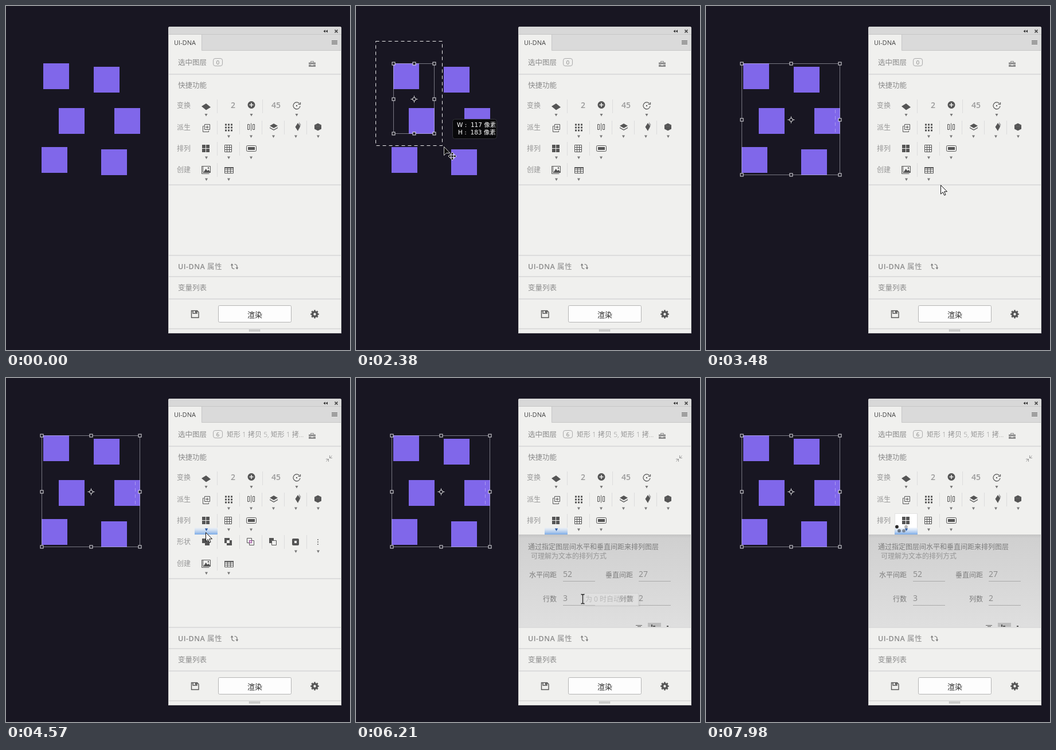
Write an HTML page that moves like this. It is 600 px wide and 600 px high and loops after 8000 ms.

```html
<!DOCTYPE html>
<html lang="zh">
<meta charset="utf-8">
<title>UI-DNA</title>
<style>
html, body { margin: 0; height: 100%; overflow: hidden; background: #181622; }
svg { display: block; width: 100vw; height: 100vh; }
text { font: 12px "Open Sans", "Noto Sans CJK SC", "Noto Sans CJK", sans-serif; fill: #7c7c7c; white-space: pre; }
text.head { font-size: 12.5px; font-weight: 500; fill: #8a8a8a; }
text.row, text.thin { font-weight: 300; fill: #959595; }
text.num { font-size: 14px; font-weight: 600; fill: #9a9a9a; text-anchor: middle; }
text.val { font-size: 14px; fill: #888; }
text.tip { font: 10.5px "DejaVu Sans", "Noto Sans CJK SC", sans-serif; fill: #fff; }
.fill { fill: #555; }
.line { fill: none; stroke: #555; }
.tri { fill: #777; }
.sep { stroke: #dcdcdc; }
.rule { fill: #dcdcdc; }
</style>
<svg id="stage" viewBox="0 0 600 600"></svg>
<script>
const stage = document.getElementById('stage');
const squares = [[65, 100], [153, 106], [92, 178], [189, 178], [62, 246], [166, 250]];
const SIZE = 45, LOOP = 8000, START = [34, 61];

// time, x, y, pointer kind ('' hides it)
const track = [
  [0, 0, 0, ''], [850, 403, 545, 'arrow'], [1070, 290, 385, 'arrow'], [1180, 70, 122, 'arrow'],
  [1290, 29, 73, 'arrow'], [1620, 37, 68, 'move'], [1730, 34, 61, 'move'],
  [1950, 59, 117, 'move'], [2170, 88, 160, 'move'], [2280, 123, 207, 'move'], [2380, 151, 244, 'move'],
  [2500, 167, 271, 'move'], [2720, 192, 294, 'move'], [2830, 212, 311, 'move'], [2950, 226, 321, 'move'],
  [3060, 237, 328, 'move'], [3270, 252, 326, 'move'], [3380, 345, 321, 'arrow'], [3480, 409, 312, 'arrow'],
  [3580, 437, 285, 'arrow'], [3810, 397, 266, 'arrow'], [3920, 360, 253, 'arrow'], [4030, 348, 251, 'arrow'],
  [4350, 348, 269, 'arrow'], [4900, 355, 305, 'arrow'], [5010, 372, 365, 'arrow'], [5120, 385, 410, 'arrow'],
  [5450, 395, 386, 'beam'], [5660, 395, 385, 'beam'], [6550, 389, 366, 'arrow'], [6650, 372, 328, 'arrow'],
  [6760, 354, 287, 'arrow'], [6870, 342, 264, 'arrow'], [7110, 341, 259, 'arrow'], [7640, 0, 0, '']
];
const hintTrack = [[0, 0], [6210, .35], [6310, 1], [6650, .75], [6760, .45], [6870, .2], [7110, 0]];
const busyTrack = [[0, 0], [7640, 1], [7750, 2], [7860, 3], [7980, 4]];

const rect = (x, y, w, h, attrs = '') => `<rect x="${x}" y="${y}" width="${w}" height="${h}" ${attrs}/>`;
const path = (d, attrs = 'class="fill"') => `<path d="${d}" ${attrs}/>`;
const text = (x, y, s, kind = '') => `<text x="${x}" y="${y}" class="${kind}">${s}</text>`;
const tris = (y, ...xs) => path(xs.map(x => `M${x - 2.5} ${y - 2}h5l-2.5 4.5z`).join(''), 'class="tri"');
const seps = (y, ...xs) => path(xs.map(x => `M${x + .5} ${y - 12}v24`).join(''), 'class="sep"');
const box = (x, y, w, h = w) => `M${x} ${y}h${w}v${h}h${-w}z`;
const rule = y => rect(284, y, 300, 2, 'class="rule"');
const grid = (x, y, dx, dy, cols, rows) => {
  let d = '';
  for (let i = 0; i <= cols; i++) d += `M${x + i * dx} ${y}v${dy * rows}`;
  for (let j = 0; j <= rows; j++) d += `M${x} ${y + j * dy}h${dx * cols}`;
  return d;
};
const dots = [0, 1, 2, 3, 4, 5, 6, 7, 8].map(i => box(382 + i % 3 * 5, 205.5 + (i / 3 | 0) * 5, 3)).join('');

const panel = `
  ${path('M283 571V39q0-3 3-3h296q3 0 3 3v532z', 'fill="#f0f0ee"')}
  ${path('M283 50V39q0-3 3-3h296q3 0 3 3v11z', 'fill="#d8d8d8"')}
  ${rect(341, 50, 244, 28, 'fill="#dadada"')}
  ${path('M283 49.5h302M341.5 50v27.5H585', 'fill="none" stroke="#c6c6c6"')}
  ${path('M283.5 50v520.5h301V50', 'fill="none" stroke="#cfcfcf"')}
  ${path('M557 41.5v5l-3.5-2.5zM561 41.5v5l-3.5-2.5z', 'fill="#333"')}
  ${path('M573.5 41.5l5 5m0-5l-5 5', 'stroke="#444" stroke-width="1.7"')}
  ${path('M568 60.5h10m-10 2h10m-10 2h10m-10 2h10', 'stroke="#666"')}
  <text x="293" y="68" style="font-size:11px;fill:#444">UI-DNA</text>
  ${text(300, 102.5, '选中图层', 'head')}
  ${rect(361.5, 91.5, 16, 13, 'rx="3.5" fill="none" stroke="#aaa"')}
  <text id="count" x="369.5" y="102" text-anchor="middle" style="font-size:9.5px"></text>
  ${path('M528 98.5h12v3h-12zM528 102.5h4v1h4v-1h4v3.5h-12z', 'fill="#888"')}
  ${path('M531.5 98.5v-2h5v2', 'fill="none" stroke="#888"')}
  ${rule(118)} ${text(300, 142.5, '快捷功能', 'head')}
  <g id="chosen">${text(385, 103, '矩形 1 拷贝 5, 矩形 1 拷...', 'thin')}
    ${path('M564.5 135v4.5h4.5M558 141.5h4.5v4.5M564.5 139.5l4-4M562.5 141.5l-4 4', 'fill="none" stroke="#999"')}</g>
  ${rect(329.5, 236.5, 39, 36, 'id="hover" fill="#fff" stroke="#e2e2e2"')}

  ${text(298, 178, '变换', 'row')} ${seps(175, 368, 447)} ${tris(190, 349, 428, 507)}
  ${path('M341 175l8-5 8 6.5-8 5z')}
  ${text(396, 178, '2', 'num')} ${text(471, 178, '45', 'num')}
  <circle cx="428" cy="172.500" r="6.500" class="fill"/>
  ${path('M428 169v7m-3.500-3.500h7', 'stroke="#f0f0ee" stroke-width="1.600"')}
  ${path('M512 170.500a6 6 0 1 0 1 4M513.500 168v3.500h-4', 'class="line" stroke-width="1.200"')}
  ${path('M506 173h2v2h-2z')}

  ${text(298, 216, '派生', 'row')} ${seps(212, 368, 407, 446, 485, 524)} ${tris(227.5, 388.5, 427.5, 466.5, 505.5, 544.5)}
  ${path('M345.500 209.500h-2v10h10v-2' + box(346.5, 206.5, 9) + 'M351 208.500v5.500m-2.700-2.700h5.500', 'class="line"')}
  ${path(dots)}
  ${path(box(421.5, 206.5, 3, 9) + box(430.5, 206.5, 3, 9) + 'M427.500 204.500v13', 'class="line"')}
  ${path('M467 205l7 4-7 4-7-4zM460 211.500l7 4 7-4v1.500l-7 4-7-4z')}
  ${path('M511 202l3.500 5-3.500 8z', 'fill="#aaa"')} ${path('M509 204l4 6-4 8-4.500-7z')}
  ${path('M544 204.500l6 3v7l-6 3-6-3v-7z')} ${path('M538.500 208l5.500 2.500 5.500-2.500', 'fill="none" stroke="#777" stroke-width=".600"')}

  ${text(298, 253, '排列', 'row')} ${seps(249, 368, 407)} ${tris(264.5, 349.5, 388.5, 427.5)}
  ${path(box(342, 242, 6) + box(349, 242, 6) + box(342, 249, 6) + box(349, 249, 6))}
  ${path(grid(381.5, 242.5, 4, 4, 3, 3), 'class="line"')}
  ${rect(419.5, 243.5, 17, 10, 'rx="2" class="line"')} ${rect(422, 246, 12, 5, 'class="fill"')}
  <g id="glow">${rect(329, 261, 40, 12, 'fill="url(#blue)"')}
    ${path('M347 262.500h5l-2.500 4.500z', 'fill="#2b5fae"')}</g>

  <g id="shape">${text(298, 290, '形状', 'row')} ${seps(286, 368, 407, 446, 485, 524)} ${tris(302.5, 505.5, 544.5)}
    ${path('M342 280h8v4h5v8h-8v-4h-5z')}
    ${path(box(381, 279, 9) + box(385, 283, 9), 'class="fill" fill-rule="evenodd"')}
    ${path(box(420.5, 279.5, 8) + box(424.5, 283.5, 8), 'class="line"')}
    ${path(box(424.5, 283.5, 4), 'fill="#e3c6e3" stroke="#a050a0"')}
    ${path('M459 279h8v4h-4v5h-4z')} ${path(box(463.5, 283.5, 8), 'class="line"')}
    ${rect(499, 280, 12, 12, 'rx="2" class="fill"')} ${rect(503, 284, 4, 4, 'fill="#eee"')}
    ${path(box(543, 281, 2) + box(543, 285, 2) + box(543, 289, 2), 'fill="#888"')}</g>
  <g id="create">${text(298, 290, '创建', 'row')} ${seps(286, 368)} ${tris(302.5, 349.5, 388.5)}
    ${path('M343.500 279.500h-2v13h13' + box(343.5, 279.5, 13, 11), 'class="line"')}
    ${path('M344.500 290l4-6 3 3.500 2-2 3 4.500z')} <circle cx="353" cy="282.500" r="1.300" class="fill"/>
    ${path(grid(381.5, 281.5, 5, 3.4, 3, 3), 'class="line"')} ${rect(381, 281, 16, 2, 'class="fill"')}
    ${rule(311)}</g>

  <g id="drawer">${rect(284, 273, 300, 161, 'fill="url(#gray)"')}
    <g id="form">
      ${text(300, 299, '通过指定图层间水平和垂直间距来排列图层')}
      ${text(305, 315, '可理解为文本的排列方式', 'thin')}
      ${text(302, 348, '水平间距')} ${text(361, 347, '52', 'val')} ${text(435, 348, '垂直间距')} ${text(493, 347, '27', 'val')}
      ${text(326, 390, '行数')} ${text(361, 389, '3', 'val')} ${text(459, 390, '列数')} ${text(493, 389, '2', 'val')}
      ${path('M361 354.500h56m76 0h56M361 396.500h56m76 0h56', 'stroke="#aaa"')}
      ${path('M488 431.500h11M491 433.500h6', 'stroke="#666"')} ${rect(509, 427, 23, 7, 'fill="#bcbcbc"')}
      ${path('M515 430h2v4h-2zM518 432h4v2h-4zM542 432h3v2h-3z')}
    </g></g>
  ${rule(434)} ${rule(471)} ${rule(510)} ${rule(562)}
  <text x="300" y="459" class="head" style="letter-spacing:.5px"><tspan font-weight="600">UI-DNA</tspan> 属性</text>
  ${path('M394 450.500v4q0 4 4.500 4M392.500 452.500l1.500-2.500 2 2.500M403 458.500v-4q0-4-4.500-4M404.500 456l-1.500 2.500-2-2.500', 'fill="none" stroke="#777" stroke-width="1.200"')}
  ${text(300, 496, '变量列表', 'head')}
  ${path('M323.500 531.500h10l2.500 2.500v9.500h-12.500zM326 532v4h7v-4', 'class="line" stroke-width="1.400"')} ${rect(330, 532, 2, 3, 'class="fill"')}
  ${rect(370.5, 522.5, 127, 29, 'rx="2" fill="#fdfdfd" stroke="#b4b4b4"')}
  <text x="434" y="542.500" text-anchor="middle" style="font-size:13px;fill:#333">渲染</text>
  <circle cx="538.500" cy="537.500" r="4" class="line" stroke-width="3.600"/>
  <circle cx="538.500" cy="537.500" r="6.200" class="line" stroke-width="2.400" pathLength="16" stroke-dasharray="1" stroke-dashoffset=".5"/>
  ${path('M424 566h19', 'stroke="#aaa" stroke-width="4" stroke-dasharray="1"')}`;

stage.innerHTML = `
  <defs>
    <linearGradient id="blue" x2="0" y2="1"><stop stop-color="#e6eefa" stop-opacity=".5"/><stop offset="1" stop-color="#7aaae6"/></linearGradient>
    <linearGradient id="gray" x2="0" y2="1"><stop stop-color="#c4c4c4"/><stop offset=".04" stop-color="#d0d0d0"/><stop offset="1" stop-color="#dfdfdf"/></linearGradient>
  </defs>
  ${squares.map(([x, y]) => rect(x, y, SIZE, SIZE, 'fill="#8067ea"')).join('')}
  ${path('M225.500 181v41', 'id="trace" stroke="#a898f0" stroke-dasharray="6 5" fill="none"')}
  ${panel}
  <g id="bounds"></g><g id="drag"></g>
  <g id="hint">${rect(400, 378, 96, 21, 'fill="#000" opacity=".1"')}${rect(398.5, 375.5, 94, 21, 'fill="#ececec" stroke="#c4c4c4"')}
    ${text(400, 390, '为 0 时自动计算')}</g>
  <g id="busy"></g>
  ${path('M.5 .5v15.500l3.700-3.400 2.500 5.600 2.300-1-2.400-5.500h4.900z', 'id="arrow" fill="#fff" stroke="#111"')}
  <g id="move">${path('M2.500 1.500v15l4-4h6.500z', 'fill="#111" stroke="#ccc"')}
    ${path('M17 11l3 3.500h-2v2.500h2.500v-2l3.500 3-3.500 3v-2h-2.500v2.500h2l-3 3.500-3-3.500h2v-2.500h-2.500v2l-3.500-3 3.500-3v2h2.500v-2.500h-2z', 'fill="#000" stroke="#fff" stroke-width=".900"')}</g>
  ${path('M-2.500-7.500h2l1 1 1-1h2M.5-6.500v14M-2.500 8.500h2l1-1 1 1h2', 'id="beam" fill="none" stroke="#222" stroke-width="1.300"')}`;

const el = id => document.getElementById(id);
const show = (id, on) => el(id).style.display = on ? '' : 'none';
const at = (keys, t) => keys.findLast(k => k[0] <= t);

function boundsOf(list) {
  if (!list.length) return '';
  const xs = list.map(s => s[0]), ys = list.map(s => s[1]);
  const l = Math.min(...xs) + .5, t = Math.min(...ys) + .5;
  const r = Math.max(...xs) + SIZE - .5, b = Math.max(...ys) + SIZE - .5;
  const cx = Math.round((l + r) / 2) + .5, cy = Math.round((t + b) / 2) + .5;
  let out = rect(l, t, r - l, b - t, 'fill="none" stroke="#c8c8d4" stroke-opacity=".55"');
  for (const x of [l, cx, r]) for (const y of [t, cy, b])
    if (x !== cx || y !== cy) out += rect(x - 2.5, y - 2.5, 5, 5, 'fill="#181622" stroke="#e4e4e8"');
  return out + `<circle cx="${cx}" cy="${cy}" r="3" fill="none" stroke="#ddd"/>` +
    path(`M${cx} ${cy - 6}v4m0 4v4M${cx - 6} ${cy}h4m4 0h4`, 'stroke="#ddd"');
}

function dragBox(x, y) {
  const [sx, sy] = START, w = x - sx, h = y - sy;
  return rect(sx + .5, sy + .5, w - 1, h - 1, 'fill="none" stroke="#eee" stroke-dasharray="6 5"') +
    rect(x + 17.5, y - 46.5, 77, 34, 'rx="4" fill="#08080a" stroke="#34343c"') +
    text(x + 25, y - 33, `W :  ${w} 像素`, 'tip') + text(x + 27, y - 20, `H :  ${h} 像素`, 'tip');
}

function busyRing(n) {
  let out = '';
  for (let k = 0; k < n; k++) {
    const a = k * Math.PI / 3, alpha = k === n - 1 ? .9 : .3 + .4 * k / n;
    out += `<circle cx="${341 + 8 * Math.cos(a)}" cy="${259.5 + 8 * Math.sin(a)}" r="2.900" fill="#111" opacity="${alpha}"/>`;
  }
  return out;
}

function draw(t) {
  const [, x, y, kind] = at(track, t);
  for (const id of ['arrow', 'move', 'beam']) show(id, id === kind);
  if (kind) el(kind).setAttribute('transform', `translate(${x} ${y})`);

  const dragging = t >= 1950 && t < 3270;
  const touched = t < 1950 ? [] : dragging ? squares.filter(s => s[0] < x && s[1] < y) : squares;
  el('bounds').innerHTML = boundsOf(touched);
  el('drag').innerHTML = dragging ? dragBox(x, y) : '';
  show('trace', t >= 3060);

  const chosen = t >= 3580;
  el('count').textContent = chosen ? 6 : 0;
  show('chosen', chosen);
  show('shape', chosen);
  el('create').setAttribute('transform', `translate(0 ${chosen ? 38 : 0})`);

  show('hover', t >= 3920 && t < 4350 || t >= 7110);
  show('glow', t >= 4350);
  show('drawer', t >= 4690);
  el('form').style.opacity = t < 4900 ? .4 : 1;
  el('hint').style.opacity = at(hintTrack, t)[1];
  el('busy').innerHTML = busyRing(at(busyTrack, t)[1]);
}

function tick() {
  draw(performance.now() % LOOP);
  requestAnimationFrame(tick);
}
tick();
</script>
</html>
```
